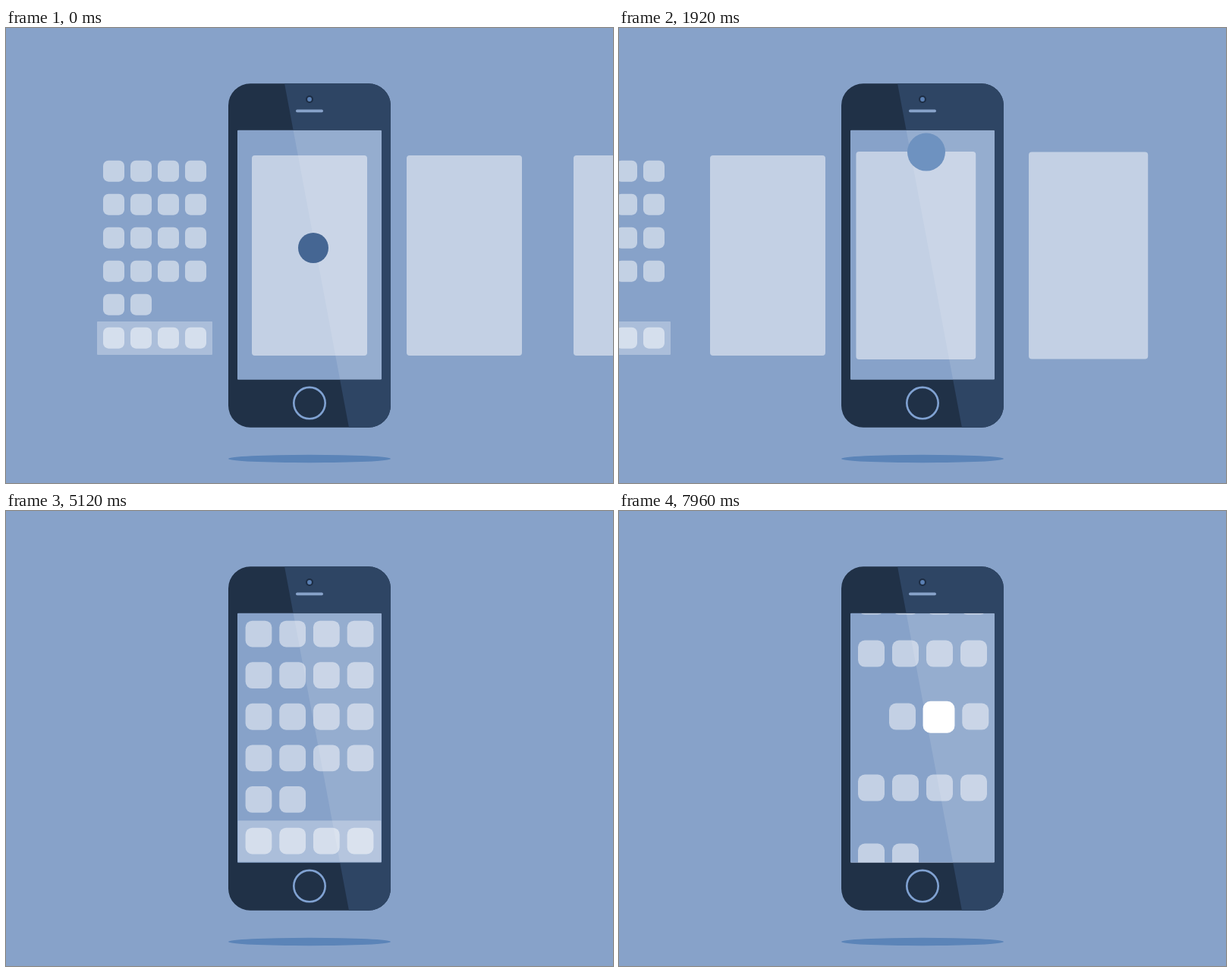
These frames come from a looping animation (800x600 px, 8000 ms). An HTML page with a canvas:

```html
<!DOCTYPE html>
<html lang="en">
<head>
<meta charset="utf-8">
<title>Phone app switcher</title>
<style>
  html, body { margin: 0; width: 100%; height: 100%; overflow: hidden; background: #87a2c9; }
  canvas { display: block; }
</style>
</head>
<body>
<canvas width="800" height="600"></canvas>
<script>
const ctx = document.querySelector('canvas').getContext('2d');
const LOOP = 8000, STEP = 40;
const BG = '#87a2c9', DARK = '#203147', GLOSS = '#2e4564';
const SCREEN = { x: 305, y: 134.8, w: 190, h: 329 };
const CARD = { y: 168, w: 152, h: 264 };
const SLOTS = [120, 324, 528, 748, 968];

const clamp = v => Math.min(1, Math.max(0, v));
const lerp = (a, b, p) => a + (b - a) * p;
const inOut = u => u < .5 ? 4 * u ** 3 : 1 - (2 - 2 * u) ** 3 / 2;
const outCubic = u => 1 - (1 - u) ** 3;
const outExpo = u => u >= 1 ? 1 : 1 - 2 ** (-10 * u);
const inOutExpo = u => u <= 0 ? 0 : u >= 1 ? 1
  : u < .5 ? 2 ** (20 * u - 10) / 2 : 1 - 2 ** (10 - 20 * u) / 2;
const outBack = u => 1 + 2.4 * (u - 1) ** 3 + 1.4 * (u - 1) ** 2;
const span = (t, from, to) => clamp((t - from) / (to - from));
const bump = u => 1 + .038 * Math.sin(Math.PI * u);

function box(x, y, w, h, r, fill) {
  ctx.beginPath();
  ctx.roundRect(x, y, w, h, r);
  ctx.fillStyle = fill;
  ctx.fill();
}

function disc(x, y, r, fill) {
  ctx.beginPath();
  ctx.arc(x, y, Math.max(0, r), 0, 7);
  ctx.fillStyle = fill;
  ctx.fill();
}

function inScreen(draw) {
  ctx.save();
  ctx.beginPath();
  ctx.rect(SCREEN.x, SCREEN.y, SCREEN.w, SCREEN.h);
  ctx.clip();
  draw();
  ctx.restore();
}

const white = a => `rgba(255,255,255,${a})`;

function card(x, y, scale = 1) {
  const dw = CARD.w * (scale - 1), dh = CARD.h * (scale - 1);
  box(x - dw / 2, y - dh / 2, CARD.w + dw, CARD.h + dh, 4, white(.5));
}

// Cards: scroll by one, close the middle one, pull down, drop.
function cards(t) {
  if (t < 1440) {
    const u = span(t, 140, 900), p = inOut(u);
    for (let i = 1; i < 5; i++) card(lerp(SLOTS[i], SLOTS[i - 1], p), CARD.y, bump(u));
    return;
  }
  if (t < 1880) {
    const up = span(t, 1440, 1840) ** 2 * 310;
    inScreen(() => card(SLOTS[1], CARD.y - up));
  }
  if (t > 4760) return;
  const near = span(t, 1640, 2220), next = span(t, 1720, 2290), far = span(t, 1840, 2680);
  const row = [
    { x: SLOTS[0], u: 0, pull: 30, from: 2960, to: 3520, drop: 4121, depth: 410 },
    { x: lerp(SLOTS[2], SLOTS[1], outBack(near)), u: near, pull: 60, from: 2800, to: 3540, drop: 4000, depth: 390 },
    { x: lerp(SLOTS[3], SLOTS[2], outBack(next)), u: next, pull: 30, from: 2960, to: 3520, drop: 4121, depth: 410 },
    { x: lerp(SLOTS[4], SLOTS[3], outCubic(far)), u: 0, pull: 12, from: 3080, to: 3520, drop: 4244, depth: 422 }
  ];
  row.forEach((c, i) => {
    const y = CARD.y + c.pull * inOut(span(t, c.from, c.to))
      + c.depth * span(t, c.drop, c.drop + 480) ** 2;
    const draw = () => card(c.x, y, bump(c.u));
    if (i === 1 && t > 2800) inScreen(draw); else draw();
  });
}

// Offsets that push the icons away from the closing app.
const ROW_PUSH = [-42, -28, 0, 39, 75, 54];
const COLUMN_PUSH = [-50, -4, 0, 2.3];

function home(x, y, s, push) {
  ctx.save();
  ctx.translate(x, y);
  ctx.scale(s, s);
  box(0, 274.2 + ROW_PUSH[5] * push, 190, 54.8, 1, white(.3));
  for (let r = 0; r < 6; r++)
    for (let c = 0; c < (r === 4 ? 2 : 4); c++) {
      if (push && r === 2 && c === 2) continue;
      const dx = r === 2 ? COLUMN_PUSH[c] * push : 0;
      box(10 + 45 * c + dx, 8.75 + 55 * r + ROW_PUSH[r] * push, 35, 35, 9, white(.5));
    }
  ctx.restore();
}

function homeScreen(t) {
  const zoom = outExpo(span(t, 4840, 5420)), s = lerp(.8, 1, zoom);
  const left = lerp(lerp(120, -84, inOut(span(t, 140, 900))), 324, inOutExpo(span(t, 4345, 4840)));
  const x = lerp(left, SCREEN.x, zoom), y = 299.3 - 164.5 * s;
  const push = t > 7760 ? 2 ** (4.5 * (1 - (t - 7760) / 200)) : 0;
  if (t < 4840) home(x, y, s, 0);
  else inScreen(() => home(x, y, s, push));
}

function app(t) {
  if (t <= 5900) return;
  let px, py, r;
  if (t <= 7760) {
    px = py = inOut(span(t, 5900, 6480));
    r = t < 6800 ? lerp(9, 4.5, px) : 0;
  } else {
    const u = (t - 7760) / 200;
    px = 2 ** (-4.5 * u);
    py = 2 ** (-5.4 * u);
    r = lerp(10, 4, py);
  }
  const x0 = lerp(405, 305, px), x1 = lerp(440, 495, px);
  const y0 = lerp(253.6, SCREEN.y, py), y1 = lerp(288.6, 463.8, py);
  inScreen(() => box(x0, y0, x1 - x0, y1 - y0, r, white(lerp(.5, 1, span(t, 5900, 6000)))));
}

function glossPath(top, bottom) {
  const edge = y => 367 + (y - 73) * 85 / 454;
  ctx.beginPath();
  ctx.moveTo(edge(top), top);
  ctx.lineTo(520, top);
  ctx.lineTo(520, bottom);
  ctx.lineTo(edge(bottom), bottom);
}

function phone() {
  ctx.save();
  ctx.beginPath();
  ctx.roundRect(293, 73.2, 214, 453.6, 29);
  ctx.roundRect(SCREEN.x, SCREEN.y, SCREEN.w, SCREEN.h, 1);
  ctx.clip('evenodd');
  ctx.fillStyle = DARK;
  ctx.fillRect(290, 70, 220, 460);
  glossPath(73, 527);
  ctx.fillStyle = GLOSS;
  ctx.fill();
  ctx.restore();

  disc(400, 94, 5, '#1d2d44');
  disc(400, 94, 2.9, '#5b80b4');
  box(382, 107.6, 36, 3.6, 1.8, '#87a2c9');
  ctx.beginPath();
  ctx.arc(400, 494.6, 20.7, 0, 7);
  ctx.lineWidth = 2.6;
  ctx.strokeStyle = '#80a2d2';
  ctx.stroke();

  inScreen(() => {
    glossPath(134, 465);
    ctx.fillStyle = white(.115);
    ctx.fill();
  });
}

// Touch: time, x, y, pressed, visible
const TOUCH = [
  [0, 405, 290, 1, 1], [120, 405, 290, 1, 1], [480, 230, 290, 1, 1], [600, 201, 290, 0, 1],
  [960, 405, 290, 0, 1], [1000, 405, 290, 0, 1], [1280, 405, 290, 1, 1], [1440, 405, 290, 1, 1],
  [1720, 405, 165, 1, 1], [1840, 405, 160, 0, 1], [2260, 405, 290, 0, 1], [2320, 405, 290, 0, 1],
  [2600, 405, 290, 1, 1], [2800, 405, 290, 1, 1], [3540, 405, 350, 1, 1], [4000, 405, 350, 1, 1],
  [4240, 405, 420, 0, 0], [4280, 422, 272, 0, 0], [5440, 422, 272, 0, 0], [5680, 422, 272, 0, 1],
  [5700, 422, 272, 0, 1], [5860, 422, 272, 1, 1], [6020, 422, 272, 0, 1], [6920, 422, 272, 0, 1],
  [7540, 400, 495, 0, 1], [7640, 400, 495, 1, 1], [7760, 400, 495, 0, 0], [8000, 400, 495, 0, 0]
];
const SWEEP = [[422, 272], [485, 185], [400, 99], [295, 290], [390, 521], [400, 495]];

function along(points, p) {
  const n = points.length - 1, i = Math.min(n - 1, Math.floor(p * n)), u = p * n - i;
  const at = k => points[Math.min(n, Math.max(0, k))];
  return [0, 1].map(d => {
    const [a, b, c, e] = [-1, 0, 1, 2].map(k => at(i + k)[d]);
    return b + u * ((c - a) + u * ((2 * a - 5 * b + 4 * c - e) + u * (3 * b - a - 3 * c + e))) / 2;
  });
}

function touch(t) {
  const i = TOUCH.findIndex((k, n) => n && t < k[0]);
  const a = TOUCH[i - 1], b = TOUCH[i], p = inOut(span(t, a[0], b[0]));
  let [x, y, press, shown] = [1, 2, 3, 4].map(k => lerp(a[k], b[k], p));
  if (a[0] === 6920) [x, y] = along(SWEEP, p);
  if (shown < .01) return;
  const rgb = [[110, 146, 192], [69, 102, 147]];
  const mix = rgb[0].map((v, k) => Math.round(lerp(v, rgb[1][k], press)));
  ctx.globalAlpha = shown;
  disc(x, y, (25 - 5 * press) * lerp(.4, 1, shown), `rgb(${mix})`);
  ctx.globalAlpha = 1;
}

function render(t) {
  ctx.fillStyle = BG;
  ctx.fillRect(0, 0, 800, 600);
  ctx.beginPath();
  ctx.ellipse(400, 568, 107, 5.2, 0, 0, 7);
  ctx.fillStyle = '#5b84b8';
  ctx.fill();
  homeScreen(t);
  cards(t);
  phone();
  app(t);
  touch(t);
}

const start = performance.now();
function tick() {
  const t = (performance.now() - start) % LOOP;
  render(Math.floor(t / STEP) * STEP);
  requestAnimationFrame(tick);
}
tick();
</script>
</body>
</html>
```
